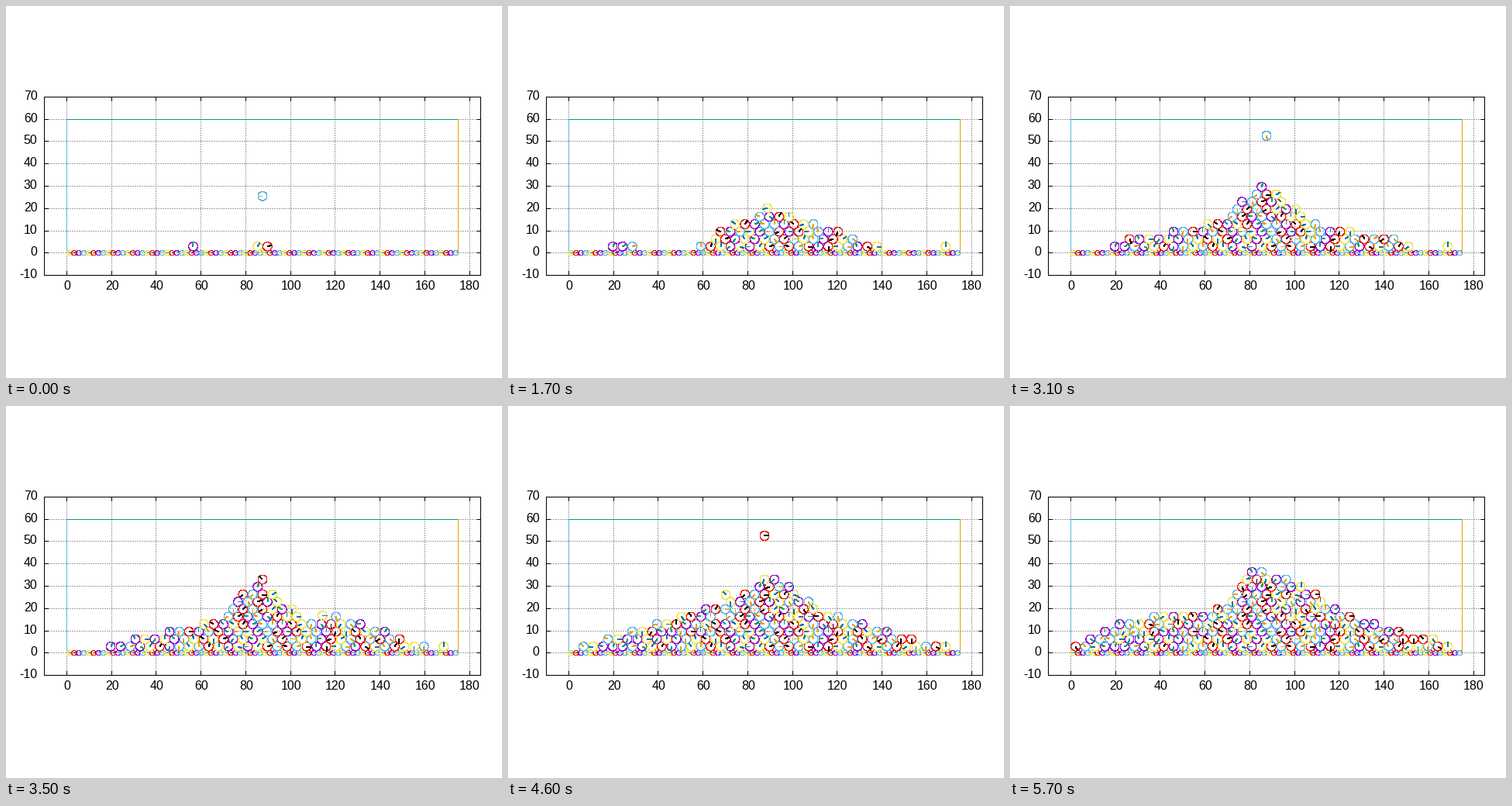
A matplotlib script that plays this animation: 640x480 px, repeating every 5.8 s.

```python
import numpy as np
import matplotlib.pyplot as plt
from matplotlib.animation import FuncAnimation
from matplotlib.collections import LineCollection

FRAMES, INTERVAL = 58, 100
PX = 0.72                      # one pixel in points at 100 dpi
GRAINS = 200
PITCH = 175 / 80               # spacing of the floor beads
R, FLOOR_R = 2.0, PITCH / 2
DROP_X, DROP_Y = 87.5, 56.0
HALF_G = 84.7                  # half of gravity; time unit = one drop period
PER_FRAME = 3.6                # drops per frame
BASE = np.sqrt((R + FLOOR_R) ** 2 - FLOOR_R ** 2)
STEP = np.sqrt(4 * R * R - PITCH ** 2)

RIMS = ["#f0e442", "#e51e10", "#9400d3", "#56b4e9"]
SPOKES = ["#0072b2", "#000000", "#009e73", "#e69f00"]

# columns of the first grains; most of them roll far away
FIRST = [39, 41, 9, 13, 77, 29, 11]

# frame -> outline of the pile: foot, shoulder, peak, shoulder, foot
OUTLINES = {
    9: [(57, 3), (74, 13), (82, 16), (91, 13), (111, 3)],
    17: [(57, 3), (74, 13), (90, 20), (110, 13), (139, 3)],
    31: [(17, 3), (66, 13), (85, 30), (112, 11), (155, 3)],
    40: [(17, 3), (67, 15), (87, 40), (108, 22), (162, 3)],
    46: [(2, 3), (72, 24), (92, 37), (110, 21), (165, 3)],
    57: [(2, 3), (24, 14), (65, 18), (82, 37), (98, 33), (122, 17), (170, 3)],
}

rng = np.random.default_rng(7)
spin = rng.normal(0, 6, GRAINS)


def clock(frame):
    return PER_FRAME * (frame + 1) + 1e-6


# ---- pile layout on a staggered lattice ----
def site(row, col):
    return np.array([col * PITCH, BASE + (row - 1) * STEP])


def pile(outline, count):
    """The lattice sites lying deepest under the outline."""
    xs, hs = zip(*outline)

    def depth(rc):
        if rc[0] == 1 and rc[1] in FIRST:
            return -99
        x, y = site(*rc)
        return y - np.interp(x, xs, hs, left=-50, right=-50)

    cells = [(r, c) for r in range(1, 16) for c in range(2 - r % 2, 80, 2)]
    return [site(*rc) for rc in sorted(cells, key=depth)[:count]]


# ---- motion ----
home, under, land, legs = [], [], [], []


def surface(x, pts):
    """Height of a grain resting at x on top of the given grains."""
    dx = np.abs(pts[:, 0] - x)
    near = dx < 2 * R
    tops = pts[near, 1] + np.sqrt(4 * R * R - dx[near] ** 2)
    return np.max(tops, initial=BASE)


def arrive(spot):
    pts = np.array(home).reshape(-1, 2)
    fall = np.sqrt((DROP_Y - surface(DROP_X, pts)) / HALF_G)
    roll = 0.2 + abs(spot[0] - DROP_X) / 27
    legs.append([(len(home) + fall + 0.12, roll, spot)])
    under.append(pts)
    land.append(fall)
    home.append(spot)


def shift(k, spot, start, length):
    legs[k].append((start, length, spot))
    home[k] = spot


def regroup(spots, t0, t1):
    """Slide settled grains to their nearest new spots, then drop new ones."""
    diff = np.abs(np.array(home)[:, None] - np.array(spots)[None])
    cost = diff[..., 0] + 2 * diff[..., 1]
    moved, taken = set(), set()
    for flat in np.argsort(cost, axis=None, kind="stable"):
        i, j = divmod(int(flat), len(spots))
        if i in moved or j in taken:
            continue
        moved.add(i)
        taken.add(j)
        if cost[i, j] > 0.01:
            shift(i, spots[j], rng.uniform(t0, t1 - 4), rng.uniform(2, 4))
    free = [s for j, s in enumerate(spots) if j not in taken]
    for s in sorted(free, key=lambda s: (s[1], -abs(s[0] - DROP_X))):
        arrive(s)


def build():
    for col in FIRST:
        arrive(site(1, col))
    t0 = len(FIRST)
    for frame, outline in OUTLINES.items():
        t1 = clock(frame)
        regroup(pile(outline, min(int(t1), GRAINS)), t0, t1)
        t0 = t1


def pose(k, t):
    fall = min(t - k, land[k])
    x, y = DROP_X, DROP_Y - HALF_G * fall ** 2
    for n, (start, length, (tx, ty)) in enumerate(legs[k]):
        u = np.clip((t - start) / length, 0, 1)
        if u <= 0:
            continue
        if n == 0:
            x += (tx - x) * (1 - (1 - u) ** 2)
            w = u ** 8
            y = ty * w + surface(x, under[k]) * (1 - w)
        else:
            e = u * u * (3 - 2 * u)
            x, y = x + (tx - x) * e, y + (ty - y) * e
    return x, y, spin[k] * fall - (x - DROP_X) / R


# ---- drawing, in pixel coordinates ----
LEFT, RIGHT, TOP, BOTTOM = 49, 612, 117, 347
ARC = np.linspace(0, 2 * np.pi, 49)


def px(x):
    return LEFT + (x + 10) * (RIGHT - LEFT) / 195


def py(y):
    return BOTTOM - (y + 10) * (BOTTOM - TOP) / 80


def crisp(v):
    return np.round(v) + 0.5


def grain(x, y, r, turn):
    rim = np.column_stack([px(x + r * np.cos(ARC)), py(y + r * np.sin(ARC))])
    spoke = np.array([(px(x), py(y)),
                      (px(x + r * np.cos(turn)), py(y + r * np.sin(turn)))])
    return [crisp(rim), crisp(spoke)]


def tints(n):
    return [c for k in range(n) for c in (RIMS[k % 4], SPOKES[k % 4])]


fig = plt.figure(figsize=(6.4, 4.8), dpi=100, facecolor="white")
ax = fig.add_axes([0, 0, 1, 1])
ax.set_xlim(0, 640)
ax.set_ylim(480, 0)
ax.axis("off")


def line(xs, ys, color, z, **kw):
    ax.plot(crisp(xs), crisp(ys), color=color, lw=PX, zorder=z, snap=False,
            antialiased=False, solid_capstyle="projecting", **kw)


def strokes(segments, colors, z):
    lines = LineCollection(segments, colors=colors, linewidths=PX, zorder=z,
                           antialiaseds=False, snap=False)
    ax.add_collection(lines, autolim=False)
    return lines


def draw_axes():
    font = dict(family="Liberation Sans", size=16 * PX, va="baseline")
    dots = dict(ls=(0, (2, 2)))
    for v in range(0, 181, 20):
        x = px(v)
        line([x, x], [BOTTOM, TOP], "#a0a0a0", 1, **dots)
        for y, d in ((BOTTOM, -5), (TOP, 5)):
            line([x, x], [y, y + d], "black", 9)
        ax.text(x + 1, 366, str(v), ha="center", **font)
    for v in range(-10, 71, 10):
        y = py(v)
        line([LEFT, RIGHT], [y, y], "#a0a0a0", 1, **dots)
        for x, d in ((LEFT, 5), (RIGHT, -5)):
            line([x, x + d], [y, y], "black", 9)
        ax.text(40.5, y + 4, str(v), ha="right", **font)
    line([LEFT, RIGHT, RIGHT, LEFT, LEFT], [TOP, TOP, BOTTOM, BOTTOM, TOP], "black", 9)


def draw_box():
    x0, x1, y0, y1 = px(0), px(175), py(0), py(60)
    line([x0, x1], [y1, y1], "#009e73", 2)
    line([x0, x0], [y0, y1], "#56b4e9", 2)
    line([x1, x1], [y0, y1], "#e69f00", 2)
    beads = []
    for j in range(80):
        beads += grain((j + 0.5) * PITCH, 0, FLOOR_R, 0)
    strokes(beads, tints(80), 3)


build()
draw_axes()
draw_box()
sand = strokes([], [], 4)


def update(i):
    t = clock(i)
    n = min(int(t) + 1, GRAINS)
    parts = []
    for k in range(n):
        x, y, turn = pose(k, t)
        parts += grain(x, y, R, turn)
    sand.set_segments(parts)
    sand.set_color(tints(n))
    return [sand]


anim = FuncAnimation(fig, update, frames=FRAMES, interval=INTERVAL,
                     init_func=lambda: update(0), repeat=True, blit=False)
plt.show()
```
